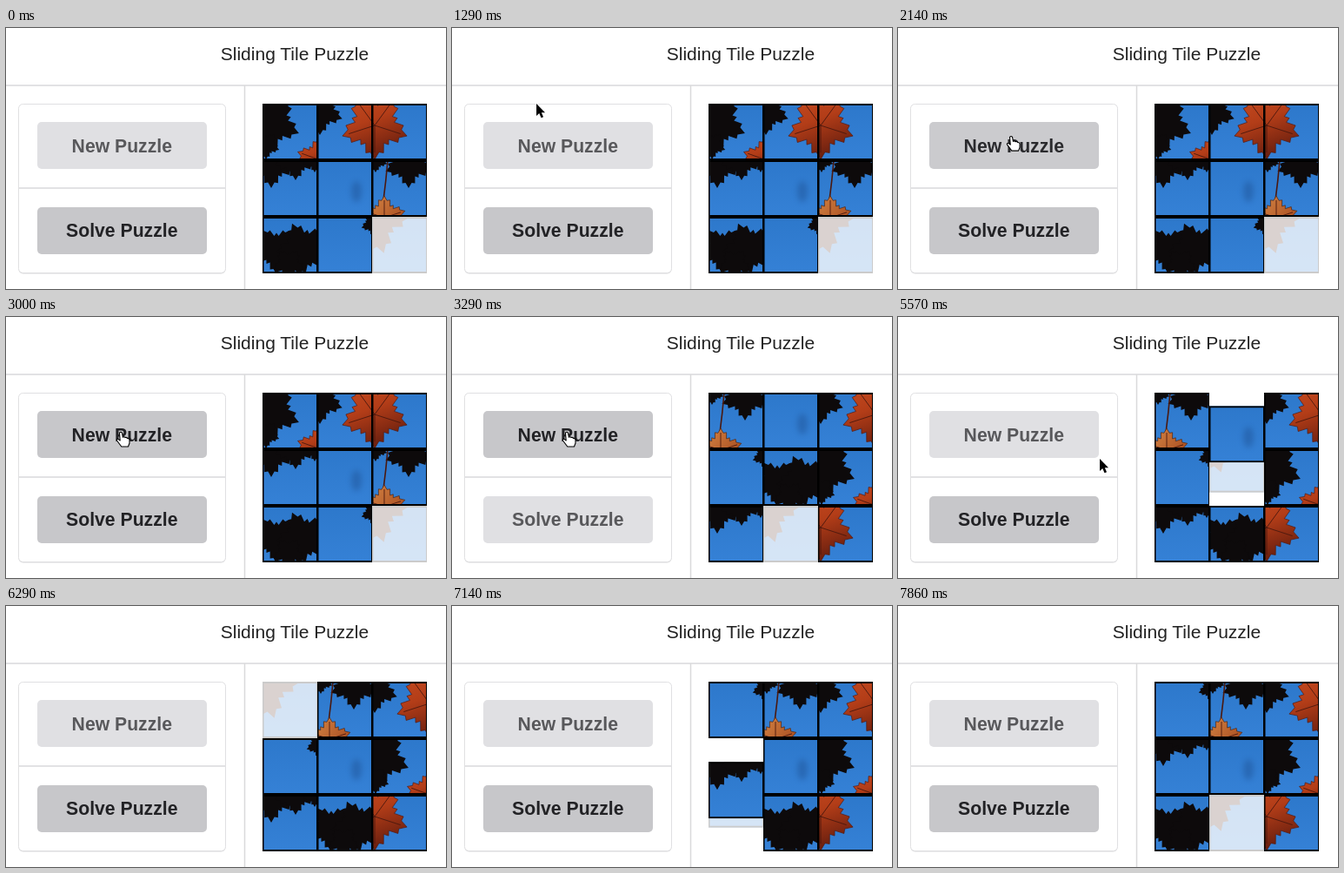
Write an HTML page that moves like this. It is 506 px wide and 300 px high and loops after 8000 ms.

```html
<!DOCTYPE html>
<html lang="en">
<head>
<meta charset="utf-8">
<title>Sliding Tile Puzzle</title>
<style>
  html, body { margin: 0; width: 100%; height: 100%; overflow: hidden; background: #fff; }
  #stage { display: block; width: 506px; height: 300px; }
  text { font: 21px "Liberation Sans", Arial, sans-serif; text-anchor: middle; fill: #222; }
  .button text { font-weight: bold; font-size: 21.2px; }
  .dark { fill: #0d0a0b; filter: blur(.7px); }
  .rust { fill: url(#rust); stroke: #54190f; stroke-width: .7; }
  .amber { fill: url(#amber); stroke: #4d2412; stroke-width: .7; }
  .brown { fill: #4a2418; }
  .vein { fill: none; stroke: #4a180e; stroke-width: .9; }
</style>
</head>
<body>
<svg id="stage" viewBox="0 0 506 300">
  <defs>
    <linearGradient id="sky" x2="0" y2="1">
      <stop stop-color="#2d78cb"/><stop offset="1" stop-color="#3581d6"/>
    </linearGradient>
    <linearGradient id="rust" x2=".4" y2="1">
      <stop stop-color="#c44a20"/><stop offset=".45" stop-color="#b33d18"/><stop offset="1" stop-color="#6c200f"/>
    </linearGradient>
    <linearGradient id="amber" x2="1" y2=".6">
      <stop stop-color="#d98a48"/><stop offset="1" stop-color="#a84d20"/>
    </linearGradient>
  </defs>

  <text x="332" y="37">Sliding Tile Puzzle</text>
  <path d="M0 66H506M274.5 66V300" stroke="#d9d9db" stroke-width="1.5"/>
  <rect x="14.5" y="88.5" width="238" height="194" rx="5" fill="#d6d6d8"/>
  <rect x="14.5" y="87.5" width="238" height="194" rx="5" fill="#fff" stroke="#e0e0e2"/>
  <path d="M15 184H252" stroke="#d9d9db" stroke-width="1.5"/>

  <g class="button" id="new"><rect x="36" y="108" width="195" height="54" rx="5"/><text x="133.3" y="143">New Puzzle</text></g>
  <g class="button" id="solve"><rect x="36" y="206" width="195" height="54" rx="5"/><text x="133.3" y="240">Solve Puzzle</text></g>

  <g id="board"></g>

  <g id="cursor" stroke-linejoin="round">
    <path id="arrow" d="M0 0V14L3.2 11 5.5 16.2 8 15.2 5.8 10.2H10Z" stroke="#fff" stroke-width="1.6" paint-order="stroke"/>
    <path id="hand" d="M-1.5 1.2Q0-.6 1.5 1.2L2.4 6.2Q4 5 5 6.6 6.6 5.8 7.6 7.4 9.4 7 10 9V13L8.5 17H.8L-4.5 10Q-5.2 7.8-3 8.4L-.8 10Z" fill="#fff" stroke="#000" stroke-width="1.1"/>
  </g>
</svg>

<script>
const LOOP = 8000, COL = 63, ROW = 65, SLIDE = 290;
const $ = id => document.getElementById(id);
const mix = (a, b, k) => a + (b - a) * k;
const ease = (t, from) => {
  const k = Math.min(1, Math.max(0, (t - from) / SLIDE));
  return k * k * (3 - 2 * k);
};

// A five-lobed leaf with a toothed edge; one tip points along `turn` degrees.
function leaf(kind, x, y, size, turn = 90) {
  const at = (angle, r) => {
    const a = angle + turn * Math.PI / 180;
    return `${(x + r * Math.cos(a)).toFixed(1)} ${(y + r * Math.sin(a)).toFixed(1)}`;
  };
  const edge = Array.from({ length: 40 }, (_, i) => {
    const angle = i * Math.PI / 20;
    return at(angle, size * (.77 + .15 * Math.cos(5 * angle) + (i % 2 ? -.08 : .08)));
  });
  const veins = [0, 1, 2, 3, 4].map(i => `M${x} ${y}L${at(i * Math.PI * .4, size * .8)}`).join('');
  return `<path class="${kind}" d="M${edge.join('L')}Z"/>` +
    (kind === 'rust' || kind === 'amber' ? `<path class="vein" d="${veins}"/>` : '');
}

// Artwork of each tile; I is the blank one.
const art = {
  A: leaf('dark', 9, 22, 35, 20) + leaf('dark', 4, 48, 16) + leaf('rust', 64, 64, 25, 200),
  B: leaf('dark', 3, 9, 27) + leaf('rust', 66, 25, 39),
  C: leaf('rust', 66 - COL, 25, 39),
  D: leaf('dark', 10, 2, 30) + leaf('dark', 38, -2, 25) + leaf('dark', 60, 0, 14),
  E: '<ellipse cx="45" cy="36" rx="6" ry="12" fill="#1d4f91" opacity=".45" style="filter:blur(3px)"/>',
  F: leaf('dark', 42, 4, 28) + leaf('dark', 4, 0, 14) +
     '<path class="vein" d="M18 0Q16 24 13 46" style="stroke-width:1.6"/>' + leaf('amber', 14, 66, 25, 270),
  G: leaf('dark', 16, 38, 28) + leaf('dark', 47, 37, 32, 30) + leaf('dark', 30, 54, 18),
  H: leaf('dark', 65, 8, 15),
  I: leaf('brown', 0, 0, 44, 0)
};

// The shuffle, then the solving moves of the blank, one every half second.
const start = 'ABCDEFGHI', shuffled = 'FEBHGADIC';
const step = { U: -3, D: 3, L: -1, R: 1 };
const slides = [[3000, shuffled]];
[...'UULDDR'].forEach((move, i) => {
  const order = [...slides[i][1]], from = order.indexOf('I'), to = from + step[move];
  [order[from], order[to]] = [order[to], order[from]];
  slides.push([4980 + i * 500, order.join('')]);
});

$('board').innerHTML = [...start].reverse().map(name =>
  `<svg id="${name}" width="${COL}" height="${ROW}" opacity="${name === 'I' ? .2 : 1}">
    <rect width="${COL}" height="${ROW}" fill="url(#sky)"/>${art[name]}
    <path d="M0 0H63V65H0ZM1.5 2V63H62V2Z"/>
  </svg>`).join('');

const cell = (order, name) => {
  const i = order.indexOf(name);
  return [295 + i % 3 * COL, 87 + Math.floor(i / 3) * ROW];
};

function drawTiles(t) {
  for (const name of start) {
    let [x, y] = cell(start, name);
    for (const [from, order] of slides) {
      const k = ease(t, from), [toX, toY] = cell(order, name);
      x = mix(x, toX, k);
      y = mix(y, toY, k);
    }
    $(name).setAttribute('x', x);
    $(name).setAttribute('y', y);
  }
}

function drawButton(id, faded) {
  const [box, label] = $(id).children;
  const grey = (a, b) => {
    const v = Math.round(mix(a, b, faded));
    return `rgb(${v},${v},${v + 3})`;
  };
  box.style.fill = grey(199, 224);
  label.style.fill = grey(34, 88);
}

// Pointer stops: arrival, departure, x, y.
const stops = [
  [930, 930, 88, 81], [1290, 1290, 97, 87], [1700, 1860, 125, 104], [2250, 3500, 132, 132],
  [4400, 4950, 147, 229], [5600, 5600, 236, 160], [6200, 6200, 262, -25]
];

function drawCursor(t) {
  const next = stops.findIndex(([, leave]) => leave > t);
  $('cursor').style.display = next > 0 ? '' : 'none';
  if (next < 1) return;
  const [, leave, x0, y0] = stops[next - 1], [arrive, , x1, y1] = stops[next];
  const k = Math.min(1, (t - leave) / (arrive - leave));
  const x = mix(x0, x1, k), y = mix(y0, y1, k);
  const over = x > 36 && x < 231 && (y > 108 && y < 162 || y > 206 && y < 260);
  $('cursor').setAttribute('transform', `translate(${x} ${y})`);
  $('hand').style.display = over ? '' : 'none';
  $('arrow').style.display = over ? 'none' : '';
}

function draw(t) {
  drawTiles(t);
  drawButton('new', 1 - ease(t, 1920) + ease(t, 4600));
  drawButton('solve', ease(t, 3000) - ease(t, 4130));
  drawCursor(t);
}

const began = performance.now();
function tick() {
  draw((performance.now() - began) % LOOP);
  requestAnimationFrame(tick);
}
tick();
</script>
</body>
</html>
```
